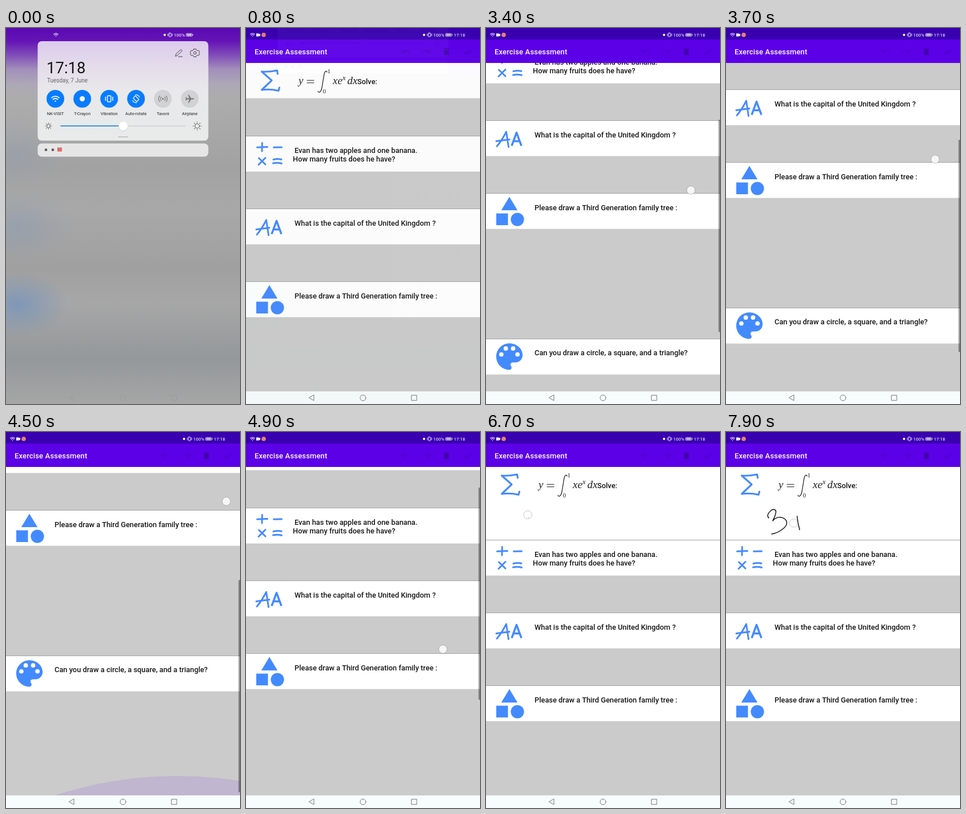
An HTML page that plays this animation: 410 px wide and 656 px high, repeating every 8 s.

```html
<!DOCTYPE html>
<html lang="en">
<head>
<meta charset="utf-8">
<title>Exercise Assessment</title>
<style>
  html, body { margin: 0; width: 100%; height: 100%; overflow: hidden; background: #cbcbcb; }
  svg { display: block; width: 410px; height: 656px; font-family: Roboto, "Open Sans", sans-serif; }
  .line { fill: none; stroke-linecap: round; stroke-linejoin: round; }
  .question { font-size: 12.85px; font-weight: 500; fill: #161616; white-space: pre; }
  .math { font: italic 19px "Liberation Serif", "Noto Serif", serif; fill: #222; }
  .limit { font: 11px "Liberation Serif", "Noto Serif", serif; fill: #222; }
  .small { font-size: 8px; fill: #fff; }
  .label { font-size: 7.5px; fill: #222; text-anchor: middle; }
</style>
</head>
<body>
<svg viewBox="0 0 410 656">
  <defs>
    <clipPath id="view"><rect y="61" width="410" height="573"/></clipPath>
    <clipPath id="screen"><rect width="410" height="656"/></clipPath>
    <linearGradient id="blur" x2="0" y2="656" gradientUnits="userSpaceOnUse">
      <stop offset="0" stop-color="#5a09b2"/><stop offset=".035" stop-color="#6414b6"/>
      <stop offset=".07" stop-color="#7f49b9"/><stop offset=".11" stop-color="#a28fbb"/>
      <stop offset=".15" stop-color="#ada8b6"/><stop offset=".19" stop-color="#acacac"/>
      <stop offset=".37" stop-color="#a2a2a2"/><stop offset=".48" stop-color="#a8a8a8"/>
      <stop offset=".64" stop-color="#a0a0a0"/><stop offset=".73" stop-color="#a7a7a7"/>
      <stop offset=".88" stop-color="#94989a"/><stop offset="1" stop-color="#a6a6a6"/>
    </linearGradient>
    <linearGradient id="sheet" x2="0" y2="1">
      <stop offset="0" stop-color="#dccbed"/><stop offset=".25" stop-color="#e4dcea"/>
      <stop offset=".5" stop-color="#e9e8eb"/><stop offset="1" stop-color="#e8ebea"/>
    </linearGradient>
    <radialGradient id="spot">
      <stop offset="0" stop-color="#7292bd"/><stop offset="1" stop-color="#7292bd" stop-opacity="0"/>
    </radialGradient>
    <g id="wifi" class="line" stroke="#fff" stroke-width="1.1">
      <path d="M-4-1.2a5.8 5.8 0 0 1 8 0M-2.5.7a3.6 3.6 0 0 1 5 0M-.3 2.6h.6"/>
    </g>
    <g id="buzz" class="line" stroke="#fff">
      <rect x="-2" y="-3.5" width="4" height="7" rx=".6"/><path d="M-4.2-2v4M4.2-2v4"/>
    </g>
    <g id="battery">
      <rect x=".5" y="-2.5" width="11" height="5" rx="1.3" fill="none" stroke="#ddd" stroke-width=".8"/>
      <rect x="1.7" y="-1.4" width="8.5" height="2.8" fill="#ddd"/><path d="M12.3-1v2" stroke="#ddd"/>
    </g>
    <path id="undo" d="M12.5 8c-2.65 0-5.05.99-6.9 2.6L2 7v9h9l-3.62-3.62c1.39-1.16 3.16-1.88 5.12-1.88 3.54 0 6.55 2.31 7.6 5.5l2.37-.78C21.08 11.03 17.15 8 12.5 8z" transform="translate(-12 -12)"/>
  </defs>

  <g clip-path="url(#view)">
    <g id="page"></g>
    <circle id="glow" r="697" fill="#6200ee" fill-opacity=".1"/>
    <rect id="bar" x="407.5" width="2.5" height="370" fill-opacity=".4"/>
  </g>

  <rect width="410" height="20.5" fill="#3900b0"/>
  <rect y="20" width="410" height="41" fill="#5c00e8"/>
  <text x="15" y="45.5" fill="#fff" font-size="13" font-weight="500" letter-spacing=".15">Exercise Assessment</text>
  <g fill="#4f03cc">
    <use href="#undo" transform="translate(280 41) scale(.66)"/>
    <use href="#undo" transform="translate(316 41) scale(-.66 .66)"/>
    <path fill="#4204ae" transform="translate(343 33) scale(.68)" d="M6 19c0 1.1.9 2 2 2h8c1.1 0 2-.9 2-2V7H6v12zM19 4h-3.5l-1-1h-5l-1 1H5v2h14V4z"/>
    <path class="line" stroke="#4f03cc" stroke-width="1.8" d="M381 41l4 4 6-7M387 43l2 2 6-7"/>
  </g>
  <g id="status"></g>

  <rect y="634" width="410" height="22" fill="#f6fdfc"/>
  <g id="nav" class="line" stroke="#777">
    <path d="M119 640.5v9.5l-8.5-4.7z"/><circle cx="205" cy="645.3" r="5"/>
    <rect x="290.2" y="640.7" width="9" height="9"/>
  </g>
  <circle id="touch" r="7.2" fill="#fff" fill-opacity=".82" stroke="#778" stroke-opacity=".4"/>

  <g id="shade" clip-path="url(#screen)">
    <rect width="410" height="656" fill="url(#blur)"/>
    <ellipse cx="20" cy="482" rx="90" ry="56" fill="url(#spot)" opacity=".75"/>
    <ellipse cx="15" cy="345" rx="100" ry="60" fill="url(#spot)" opacity=".28"/>
    <ellipse cx="15" cy="220" rx="90" ry="55" fill="url(#spot)" opacity=".18"/>
    <use href="#nav" opacity=".22"/>
    <g id="shadeStatus"></g>
    <g id="panel"></g>
  </g>
</svg>
<script>
const $ = id => document.getElementById(id);
const set = (id, attrs) => {
  for (const name in attrs) $(id).setAttribute(name, attrs[name]);
};
const show = (id, on) => set(id, { visibility: on ? 'visible' : 'hidden' });
const clamp = (v, a, b) => Math.min(b, Math.max(a, v));

const BLUE = '#448aff', ACCENT = '#087cff';
const LOOP = 8000, MAX_SCROLL = 306;

const text = (x, y, s, cls = 'question', extra = '') =>
  `<text x="${x}" y="${y}" class="${cls}" ${extra}>${s}</text>`;
const line = (d, color, width = 1, extra = '') =>
  `<path class="line" d="${d}" stroke="${color}" stroke-width="${width}" ${extra}/>`;
const disc = (x, y, r, fill) => `<circle cx="${x}" cy="${y}" r="${r}" fill="${fill}"/>`;
const use = (id, x, y, s = 1) => `<use href="#${id}" transform="translate(${x} ${y}) scale(${s})"/>`;

const phoneState = x => disc(x, 12, 2, '#fff') + use('buzz', x + 9.5, 12, .9)
  + text(x + 16, 14.9, '100%', 'small') + use('battery', x + 37, 12);

function buildPage() {
  const rows = [61, 189, 316, 443, 697].map(y =>
    `<rect y="${y - 1}" width="410" height="1" fill="#a3a3a3"/><rect y="${y}" width="410" height="61.5" fill="#fff"/>`);
  const sigma = line('M55.5 80L54.5 74Q40 77 27.5 76L45 91.5L27.5 108Q43 106 57 109.5L58.5 104', BLUE, 3.1);
  const formula = text(92, 98, 'y', 'math') + line('M107 91.3h12M107 95.7h12', '#222')
    + line('M142 77C141 73.5 138 75 136.7 82L133 104C131.5 111.5 128 114 126 110.5', '#222', 1.3)
    + text(142.5, 79, '1', 'limit') + text(134.5, 114, '0', 'limit')
    + text(152, 98, 'xe', 'math') + text(169, 91, 'x', 'math', 'style="font-size:12.5px"')
    + text(177.5, 98, 'dx', 'math') + text(195, 98.3, 'Solve:');
  const signs = line('M19.5 208.2L37.5 207.5M28.3 200.5L28 215M48.5 208.3L62.5 208'
    + 'M22.5 227L34 238M34 226.5L22 238.5M48 229.5Q55 227.8 62 229.3M47.5 236Q55 234.3 62.5 236.3', BLUE, 3);
  const letters = line('M19 360.5Q28 350 35.5 335L39.5 361.5M18 351.5Q28 350 41 348.5', BLUE, 2.9)
    + line('M45 359.5L53.5 336.5L62 359.5M48.5 351.5H58.5', BLUE, 3.6, 'style="stroke-linecap:butt"');
  const shapes = `<path fill="${BLUE}" d="M41 448.5l14.2 23.5h-28.4z"/>`
    + `<rect x="18" y="477.5" width="20.5" height="20.5" fill="${BLUE}"/>` + disc(55, 488, 11.6, BLUE);
  const holes = [[6.5, 10.5], [9.5, 6.5], [14.5, 6.5], [17.5, 10.5]].map(([x, y]) => disc(x, y, 1.5, '#fff'));
  const palette = `<g transform="translate(10.2 696.5) scale(2.57)">
    <path fill="${BLUE}" d="M12 3c-4.97 0-9 4.03-9 9s4.03 9 9 9c.83 0 1.5-.67 1.5-1.5 0-.39-.15-.74-.39-1.01-.23-.26-.38-.61-.38-.99 0-.83.67-1.5 1.5-1.5H16c2.76 0 5-2.24 5-5 0-4.42-4.03-8-9-8z"/>
    ${holes.join('')}</g>`;
  $('page').innerHTML = '<rect y="61" width="410" height="900" fill="#cbcbcb"/>' + rows.join('')
    + '<rect id="answer" y="122" width="410" height="66" fill="#fff"/>'
    + sigma + formula + signs + letters + shapes + palette
    + text(85, 217.6, 'Evan has two apples and one banana.')
    + text(82, 232.8, 'How many fruits does he have?')
    + text(85, 344.6, 'What is the capital of the United Kingdom ?')
    + text(85, 471.6, 'Please draw a Third Generation family tree :')
    + text(85, 725, 'Can you draw a circle, a square, and a triangle?')
    + line('M75 150C71 146 74 141 79 137C84 133 89 136 87 142C86 148 83 152 82 155C87 148 97 147 102 151C109 156 107 163 101 168C95 173 88 177 80 178', '#111', 1.5, 'id="three"')
    + line('M124.5 147Q126 160 129 170.5', '#111', 1.5, 'id="stem"');
}

function buildPanel() {
  const tiles = [
    ['NK-VISIT', 1, use('wifi', 0, 0, 1.6)],
    ['T-Crayon', 1, disc(0, 0, 4.5, '#fff')],
    ['Vibration', 1, use('buzz', 0, 0, 1.5)],
    ['Auto-rotate', 1, '<rect x="-2.8" y="-4.5" width="5.6" height="9" rx="1" class="line" stroke="#fff" stroke-width="1.2" transform="rotate(-45)"/>'
      + line('M-6 3A6.8 6.8 0 0 0 1 6.7M6-3A6.8 6.8 0 0 0-1-6.7', '#fff', 1.2)],
    ['Tavoni', 0, disc(0, 0, 1.5, '#777')
      + line('M-3-3a4.3 4.3 0 0 0 0 6m6-6a4.3 4.3 0 0 1 0 6M-5.5-5a7 7 0 0 0 0 10m11-10a7 7 0 0 1 0 10', '#777', 1.1)],
    ['Airplane', 0, '<path transform="rotate(90)" fill="#777" d="M-1-6.5q1-2 2 0v4l6 4v1.5l-6-2v4l2 1.5v1L0 6.8l-3 .7v-1l2-1.5V1l-6 2V1.5l6-4z"/>']
  ].map(([name, on, icon], i) => {
    const x = 86.5 + i * 47.1;
    return `<g transform="translate(${x} 123.5)">${disc(0, 0, 15.5, on ? ACCENT : '#d2d2d4')}${icon}</g>`
      + text(x, 152, name, 'label');
  });
  const sun = (x, r) => {
    let rays = '';
    for (let i = 0; i < 8; i++) {
      const c = Math.cos(i * Math.PI / 4) * r, s = Math.sin(i * Math.PI / 4) * r;
      rays += `M${x + c * 1.55} ${171 + s * 1.55}L${x + c * 1.8} ${171 + s * 1.8}`;
    }
    return `<circle cx="${x}" cy="171" r="${r}" class="line" stroke="#555"/>` + line(rays, '#555', 1.1);
  };
  const gear = '<g transform="translate(331 43.5)" class="line" stroke="#444"><path d="M-2-6.8h4l.8 2 2 .9 2-.3 1.5 2.5-1.2 1.7 1.2 1.7-1.5 2.5-2-.3-2 .9-.8 2h-4l-.8-2-2-.9-2 .3-1.5-2.5 1.2-1.7-1.2-1.7 1.5-2.5 2 .3 2-.9z"/><circle r="2.3"/></g>';
  $('panel').innerHTML = '<rect x="55.5" y="23" width="299" height="173.5" rx="7" fill="url(#sheet)"/>'
    + '<rect x="55.5" y="201.5" width="299" height="23" rx="7" fill="#e6e6e6"/>'
    + text(71, 79, '17:18', '', 'font-size="27.5" fill="#151515"')
    + text(72, 95, 'Tuesday, 7 June', '', 'font-size="10" fill="#666"')
    + line('M297 49l1-4 8.5-7.5 2.3 2.3-8.5 8zM302 50h7', '#444') + gear + tiles.join('')
    + sun(74.5, 3) + sun(335, 4) + line('M96 170.7h218', '#d0d0d2', 1.6) + line('M96 170.7h109', ACCENT, 1.6)
    + disc(205.5, 171.5, 8.3, '#cfcfd1') + disc(205.5, 171, 7.8, '#fff') + line('M197 190h16', '#bbb', 1.4)
    + disc(70, 212.5, 2.3, '#555') + disc(82, 212.5, 2.3, '#555')
    + '<rect x="90" y="208.5" width="8" height="7" fill="#d9706a"/>';
}

buildPage();
buildPanel();
$('status').innerHTML = use('wifi', 11.5, 12, .95)
  + '<path fill="#fff" d="M18 9.5h4.5v1.5l2.5-1.3v4.8l-2.5-1.3v1.5H18z"/>'
  + disc(31, 12, 3.8, '#e5836a') + phoneState(312) + text(364, 14.9, '17:18', 'small');
$('shadeStatus').innerHTML = use('wifi', 87.5, 12, .95) + phoneState(278);

// Finger drag: time, x, y
const DRAG = [
  [2800, 338, 462], [3400, 359, 283], [4000, 374, 175], [4500, 386, 121],
  [4900, 345, 379], [5150, 333, 452], [5400, 330, 464]
];

function finger(t) {
  const time = clamp(t, DRAG[0][0], DRAG[DRAG.length - 1][0]);
  const i = Math.max(1, DRAG.findIndex(p => time <= p[0]));
  const [t0, x0, y0] = DRAG[i - 1], [t1, x1, y1] = DRAG[i];
  const k = (time - t0) / (t1 - t0);
  return [x0 + (x1 - x0) * k, y0 + (y1 - y0) * k];
}

const length = {};
for (const id of ['three', 'stem']) {
  length[id] = $(id).getTotalLength();
  set(id, { 'stroke-dasharray': `${length[id]} ${length[id] + 9}` });
}

function write(id, k) {
  show(id, k > 0);
  set(id, { 'stroke-dashoffset': length[id] * (1 - k) });
}

function along(id, k) {
  const p = $(id).getPointAtLength(length[id] * Math.min(1, k));
  return [p.x, p.y];
}

function touchAt(t) {
  if (t >= 2800 && t <= 5400) return finger(t);
  if (t >= 6700 && t <= 7400) return along('three', (t - 6700) / 700 + .055);
  if (t >= 7550 && t < 7800) return along('stem', (t - 7550) / 200);
  return t >= 7800 ? [118.5, 159] : null;
}

function draw(t) {
  // Notification shade closing
  const k = clamp(t / 900, 0, 1), ease = k * k * (3 - 2 * k);
  show('shade', k < 1);
  set('shade', { opacity: 1 - ease });
  set('panel', { transform: `translate(0 ${-150 * ease})` });

  // List scrolling; the pull past the end shifts the way back slightly
  const anchor = t > 4500 ? 435 : 437;
  const want = anchor - finger(t)[1], scroll = clamp(want, 0, MAX_SCROLL);
  set('page', { transform: `translate(0 ${-scroll})` });
  set('bar', {
    y: 61 + scroll * .645,
    opacity: t < 2900 ? 0 : clamp((6100 - t) / 300, 0, 1)
  });

  // Edge glow
  const atTop = want < 0;
  let glow = 0;
  if (want > MAX_SCROLL) glow = Math.min(45, (want - MAX_SCROLL) * 3.4);
  else if (atTop && t > 4900) glow = Math.min(40, -want * 2) * clamp((5700 - t) / 300, 0, 1);
  show('glow', glow > 0);
  set('glow', { cx: atTop ? 260 : 300, cy: atTop ? 61 + glow - 697 : 634 - glow + 697 });

  // Handwritten answer
  show('answer', t >= 6700);
  write('three', t < 6700 ? 0 : clamp((t - 6700) / 700 + .01, 0, 1));
  write('stem', clamp((t - 7550) / 200, 0, 1));

  const point = touchAt(t);
  show('touch', point);
  if (point) set('touch', { transform: `translate(${point})` });
}

const start = performance.now();
function tick(now) {
  const t = Math.max(0, now - start) % LOOP;
  draw(Math.floor(t / 100) * 100);
  requestAnimationFrame(tick);
}
draw(0);
requestAnimationFrame(tick);
</script>
</body>
</html>
```
